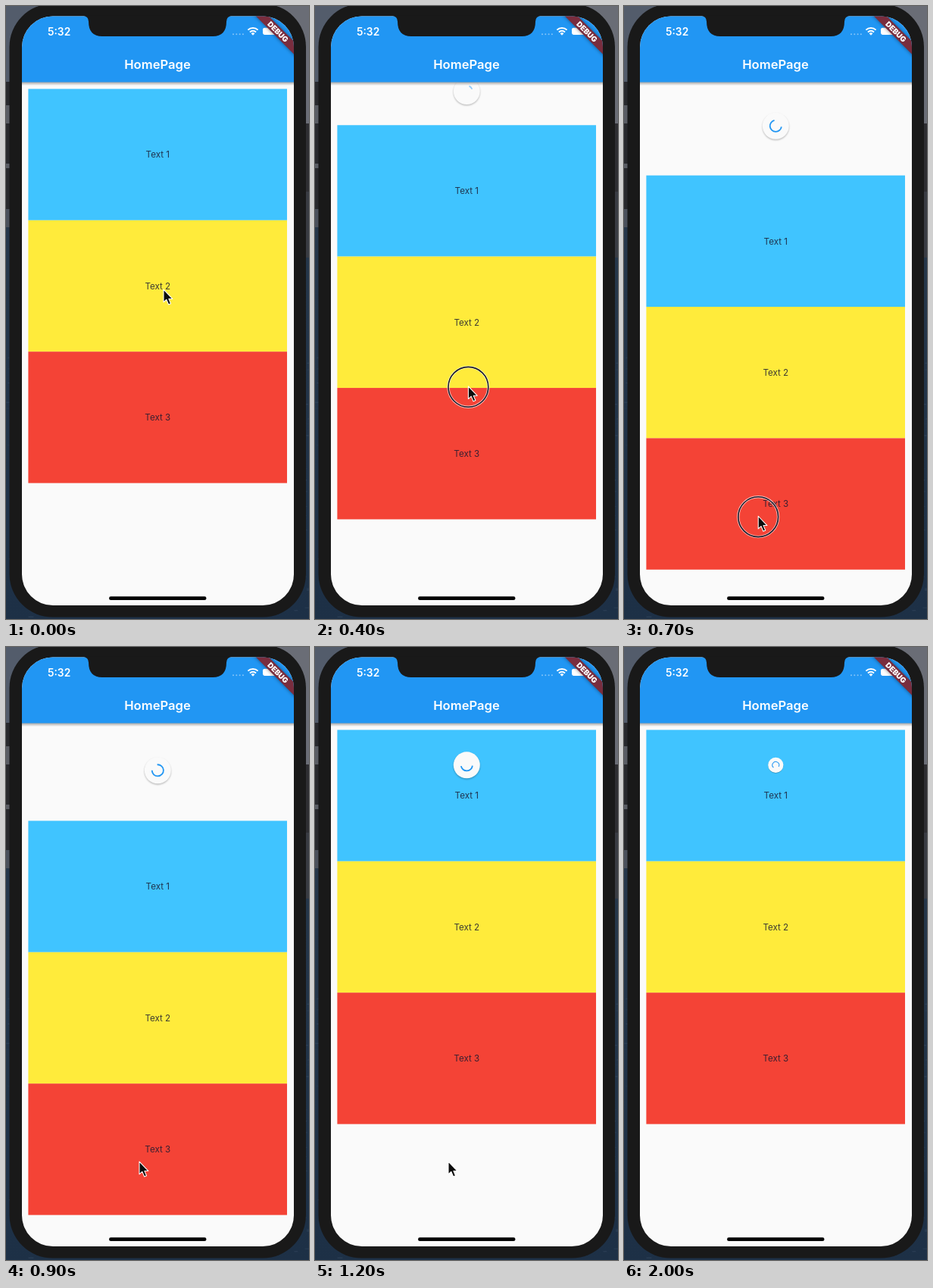
These frames come from a looping animation (400 by 809 pixels, 2100 ms). An HTML page:

```html
<!DOCTYPE html>
<html lang="en">
<head>
<meta charset="utf-8">
<title>Pull to refresh</title>
<style>
  html, body { margin: 0; width: 100%; height: 100%; overflow: hidden; background: #1c2d40; }
  svg { display: block; width: 100%; height: 100%; font-family: Inter, Roboto, sans-serif; }
  .label { font-size: 11.6px; fill: #1a1a30; fill-opacity: .85; text-anchor: middle; }
</style>
</head>
<body>
<svg viewBox="0 0 400 809">
  <defs>
    <linearGradient id="sea" x1="0" y1="0" x2="0" y2="1">
      <stop offset="0" stop-color="#2b3b4d"/>
      <stop offset="1" stop-color="#1d3046"/>
    </linearGradient>
    <linearGradient id="barShadow" x1="0" y1="0" x2="0" y2="1">
      <stop offset="0" stop-color="#000" stop-opacity=".36"/>
      <stop offset="1" stop-color="#000" stop-opacity="0"/>
    </linearGradient>
    <clipPath id="screen"><rect x="21" y="13.5" width="359" height="777.5" rx="41"/></clipPath>
    <clipPath id="content"><rect x="21" y="100.5" width="359" height="691"/></clipPath>
    <filter id="soft" x="-50%" y="-50%" width="200%" height="200%"><feGaussianBlur stdDeviation="1.1"/></filter>
    <filter id="wide" x="-50%" y="-50%" width="200%" height="200%"><feGaussianBlur stdDeviation="2.5"/></filter>
  </defs>

  <!-- desktop behind the phone -->
  <rect width="400" height="809" fill="url(#sea)"/>
  <g id="waves" stroke="#4a6078" stroke-width="1.2"></g>
  <rect width="60" height="100" fill="#535c6b"/>
  <rect y="100" width="8" height="168" fill="#28292d"/>
  <rect y="131" width="8" height="24" fill="#5a5d64"/>
  <rect y="208" width="8" height="6" fill="#5a5d64"/>
  <rect y="268" width="8" height="24" fill="#4b515c"/>
  <rect x="340" width="60" height="155" fill="#6a6d76"/>
  <rect x="392" y="155" width="8" height="90" fill="#2e2e32"/>
  <rect x="392" y="245" width="8" height="87" fill="#393c43"/>

  <rect x="4.5" y="-3" width="391.5" height="809.5" rx="57" fill="#191919"/>

  <g clip-path="url(#screen)">
    <rect x="21" y="13" width="359" height="779" fill="#fafafa"/>
    <g clip-path="url(#content)">
      <g id="cards"></g>
      <g id="spinner">
        <circle cy="1.3" r="17.5" fill="#000" opacity=".26" filter="url(#soft)"/>
        <circle r="17.5" fill="#fafafa"/>
        <path id="arc" fill="none" stroke="#2196f3" stroke-width="1.8"/>
      </g>
    </g>
    <rect x="21" y="100" width="359" height="5" fill="url(#barShadow)"/>
    <rect x="21" y="13" width="359" height="87.5" fill="#2196f3"/>
    <text x="200" y="82.7" font-size="16.6" font-weight="600" fill="#fff" text-anchor="middle">HomePage</text>
    <text x="55" y="38.7" font-size="13.8" font-weight="600" fill="#fff">5:32</text>

    <g fill="#fff">
      <g id="signal" opacity=".45"></g>
      <path d="M326 38.8l-2.4-2.6a3.4 3.4 0 0 1 4.8 0z"/>
      <g fill="none" stroke="#fff" stroke-width="2">
        <path d="M322 34.5a5.7 5.7 0 0 1 8 0"/>
        <path d="M319.4 31.6a9.4 9.4 0 0 1 13.2 0"/>
      </g>
      <rect x="339" y="28.8" width="19.5" height="9.2" rx="2.4"/>
    </g>

    <g transform="translate(359 34) rotate(45)">
      <rect x="-50" y="-6" width="100" height="12" fill="#000" opacity=".45" filter="url(#wide)"/>
      <rect x="-50" y="-6" width="100" height="12" fill="#792d3e"/>
      <text y="3.5" font-size="9.8" font-weight="900" fill="#fff" text-anchor="middle">DEBUG</text>
    </g>
    <rect x="136" y="779.3" width="128.5" height="4.8" rx="2.4" fill="#050505"/>
  </g>

  <path d="M101 12.5q8 1 8 8q0 19.5 18 19.5h146q18 0 18-19.5q0-7 8-8z" fill="#191919"/>

  <g id="pointer">
    <g id="ring" fill="none">
      <circle r="26.4" stroke="#fff" stroke-opacity=".65" stroke-width="3.4"/>
      <circle r="26.4" stroke="#1c1c2c" stroke-width="1.6"/>
    </g>
    <path d="M0 -1V16.6L4 13L7 20L10 18.7L7.2 12H12.4Z" transform="scale(.95)" fill="#0c0c0c" stroke="#fff" stroke-width="1.1" stroke-linejoin="round"/>
  </g>
</svg>

<script>
const LOOP = 2100, STEP = 100;
const PRESS = 200, RELEASE = 900, POINTER_GONE = 1300, SHRINK = 1900;
const MAX_PULL = 120;
const $ = id => document.getElementById(id);
const show = (el, on) => el.setAttribute("visibility", on ? "visible" : "hidden");

const progress = (t, from, to) => Math.min(1, Math.max(0, (t - from) / (to - from)));
const easeInOut = u => (1 - Math.cos(Math.PI * u)) / 2;

function arcPath(start, sweep, r) {
  const point = deg => {
    const a = deg * Math.PI / 180;
    return `${r * Math.cos(a)} ${r * Math.sin(a)}`;
  };
  return `M${point(start)}A${r} ${r} 0 ${sweep > 180 ? 1 : 0} 1 ${point(start + sweep)}`;
}

function buildScene() {
  const cardHeight = 173.4;
  $("cards").innerHTML = ["#40c4ff", "#ffeb3b", "#f44336"].map((color, i) => {
    const y = 109.4 + i * cardHeight;
    return `<rect x="29.4" y="${y}" width="341.6" height="${cardHeight}" fill="${color}"/>
      <text class="label" x="200.3" y="${y + 91}">Text ${i + 1}</text>`;
  }).join("");

  $("signal").innerHTML = Array.from({ length: 4 }, (_, i) =>
    `<circle cx="${300 + i * 4.3}" cy="37.3" r="1"/>`).join("");

  let seed = 7;
  const random = () => (seed = seed * 16807 % 2147483647) / 2147483647;
  $("waves").innerHTML = Array.from({ length: 160 }, () => {
    const x = random() < .5 ? random() * 30 : 400 - random() * 30;
    return `<path d="M${x} ${335 + random() * 474}h${3 + random() * 6}" opacity="${random() * .4}"/>`;
  }).join("");
}

function draw(t) {
  // The list lags a little behind the pointer, then springs back on release.
  const moved = easeInOut(progress(t, 110, 757));
  const dragged = easeInOut(progress(t, 92, 800));
  const released = t >= RELEASE;
  const pull = MAX_PULL * dragged * (1 - progress(t, RELEASE, 1133)) ** 3;
  $("cards").setAttribute("transform", `translate(0 ${pull})`);

  const reach = MAX_PULL * dragged;
  const settle = 7 * progress(t, RELEASE, 1000);
  const y = 87 + .47 * reach + .00135 * reach ** 2 - settle;
  const scale = 1 - .42 * progress(t, SHRINK, 2000);
  show($("spinner"), t >= PRESS);
  $("spinner").setAttribute("transform", `translate(200.3 ${y}) scale(${scale})`);

  const start = released ? 265 + 585 * easeInOut(progress(t, RELEASE, 2000)) : 132 * dragged - 118;
  const sweep = released ? 190 + 85 * Math.cos(2 * Math.PI * (t - RELEASE) / 1000) : 275 * dragged ** 2;
  $("arc").setAttribute("d", arcPath(start, sweep, 7.6));
  $("arc").setAttribute("opacity", Math.min(1, 1.15 * dragged));

  show($("pointer"), t < POINTER_GONE);
  $("pointer").setAttribute("transform", `translate(${208 - 32 * moved ** 2} ${375 + 305 * moved})`);
  $("ring").setAttribute("opacity", t >= PRESS && !released ? 1 : 0);
}

buildScene();
const begin = performance.now();
function tick() {
  const t = (performance.now() - begin) % LOOP;
  draw(Math.floor(t / STEP) * STEP);
  requestAnimationFrame(tick);
}
tick();
</script>
</body>
</html>
```
